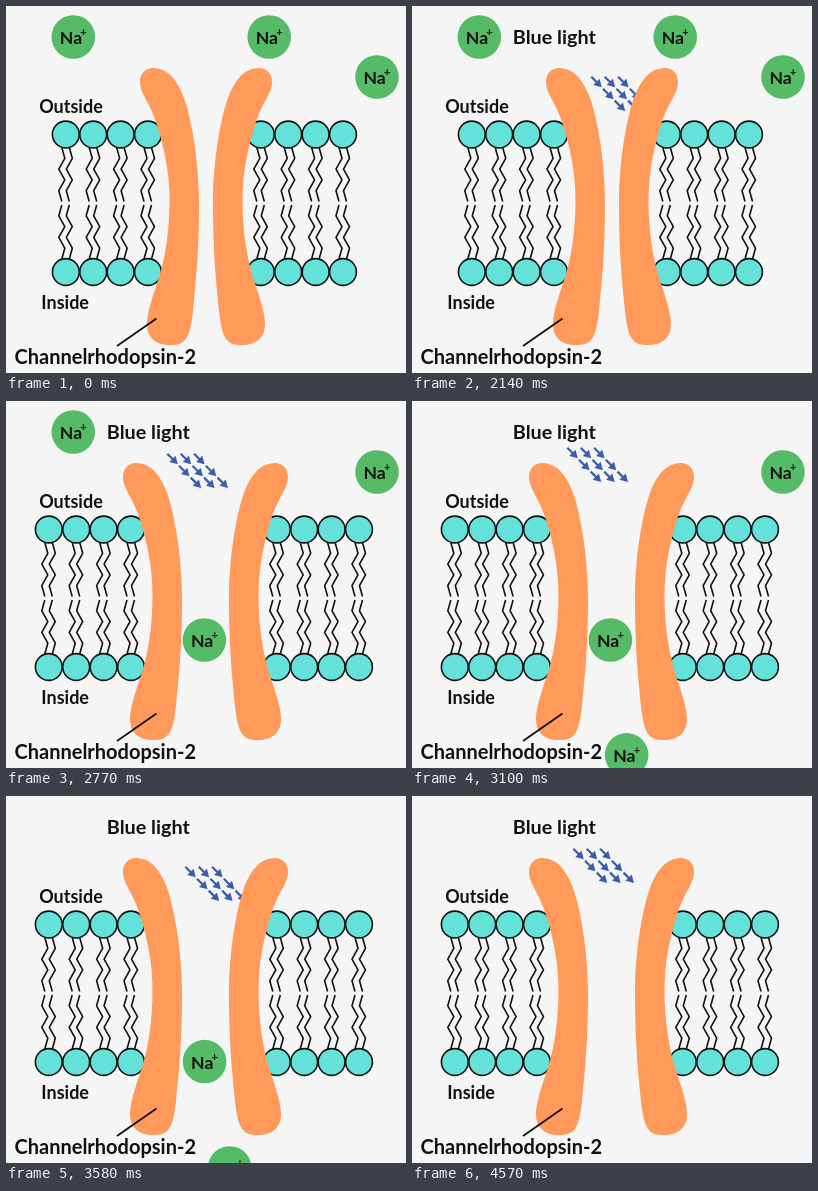
Write an HTML page that moves like this. It is 400 px wide and 367 px high and loops after 4600 ms.

```html
<!DOCTYPE html>
<html lang="en">
<head>
<meta charset="utf-8">
<title>Light-gated ion channel</title>
<style>
  html, body { margin: 0; width: 100%; height: 100%; overflow: hidden; background: #f5f5f5; }
  svg { display: block; width: 100%; height: 100%; }
  text { font-family: Lato, "Open Sans", sans-serif; font-weight: 700; fill: #111; }
  .head { fill: #64e1d8; stroke: #111; stroke-width: 1.6; }
  .tail { fill: none; stroke: #111; stroke-width: 1.6; stroke-linejoin: round; }
  .arrow { fill: none; stroke: #3a5db0; stroke-width: 2.2; }
  .arrow .tip { fill: #3a5db0; stroke: none; }
  .channel { fill: #ff9a5a; }
  .ion circle { fill: #56bb67; }
</style>
</head>
<body>
<svg viewBox="0 0 400 367">
  <defs>
    <g id="lipid">
      <path id="tails" class="tail"/>
      <circle class="head" r="13.4"/>
    </g>
    <g id="arrow" class="arrow">
      <path d="M-5 -5 L1 1"/>
      <path class="tip" d="M5.500 5.500 L-3 3.200 L3.200 -3 Z"/>
    </g>
    <path id="channel" class="channel" d="M134 76 C134 67 140 62 147 62
      C163 62 172 76 178 92 S193 150 193 198 S190 275 187 305 S178 339 164 339
      S141 332 141 318 S149 285 154 268 S163.500 225 163.500 195 S158 142 151 119 S134 88 134 76 Z"/>
    <g id="ion" class="ion">
      <circle r="21.8"/>
      <text x="-13.500" y="7" font-size="17.600">Na</text>
      <text x="7" y="-.8" font-size="11">+</text>
    </g>
  </defs>
  <g id="arrows"></g>
  <g id="left"></g>
  <g id="right"></g>
  <path d="M111 340 L150.500 312.500" stroke="#111" stroke-width="1.8"/>
  <text x="33.200" y="107" font-size="18">Outside</text>
  <text x="35.300" y="303" font-size="18">Inside</text>
  <text x="8.500" y="358" font-size="20">Channelrhodopsin-2</text>
  <text id="light" x="100.800" y="38" font-size="19.800">Blue light</text>
  <g id="ions"></g>
</svg>
<script>
const LOOP = 4600, START = 1900, STEP = 30;
const $ = id => document.getElementById(id);
const clamp = (v, lo = 0, hi = 1) => Math.min(hi, Math.max(lo, v));
const lerp = (a, b, u) => a + (b - a) * u;
const smooth = u => u * u * (3 - 2 * u);
const easeOut = u => Math.sin(u * Math.PI / 2);
const bezier = (a, b, c, d, u) => lerp(
  lerp(lerp(a, b, u), lerp(b, c, u), u),
  lerp(lerp(b, c, u), lerp(c, d, u), u), u);

function use(parent, id, transform = '') {
  const el = document.createElementNS('http://www.w3.org/2000/svg', 'use');
  el.setAttribute('href', '#' + id);
  el.setAttribute('transform', transform);
  parent.appendChild(el);
  return el;
}

const move = (el, x, y) => el.setAttribute('transform', `translate(${x.toFixed(2)} ${y.toFixed(2)})`);

// A strand starts and ends on its axis and swings to both sides between
function zigzag(x) {
  const points = Array.from({ length: 6 }, (_, i) => {
    const swing = i % 5 === 0 ? 0 : i % 2 ? 3 : -3;
    return `${x + swing} ${13 + i * 10.8}`;
  });
  return 'M' + points.join(' L');
}
$('tails').setAttribute('d', zigzag(-4) + zigzag(3.5));

// Each half: four lipid pairs behind one channel wall
function buildHalf(half, firstX, wall) {
  for (let i = 0; i < 4; i++) {
    const x = firstX + i * 27.4;
    use(half, 'lipid', `translate(${x} 128.500)`);
    use(half, 'lipid', `translate(${x} 266) scale(1 -1)`);
  }
  use(half, 'channel', wall);
}
buildHalf($('left'), 59.8, '');
buildHalf($('right'), 254.8, 'translate(400 0) scale(-1 1)');

const arrows = Array.from({ length: 9 }, (_, i) => {
  const row = Math.floor(i / 3), col = i % 3;
  return { el: use($('arrows'), 'arrow'), row, x: 160.3 + row * 11.7 + col * 13.4, y: 51.8 + row * 11.9 };
});

// An ion leaves its place, reaches the pore at `gate` and sinks away during `sink`
const PORE = { x: 198.4, y: 239 };
const ions = [
  { x: 67.3, y: 31, top: 31, leave: 2770, gate: 3100, sink: 700 },
  { x: 263.2, y: 31, top: 31, leave: 2290, gate: 2770, sink: 600 },
  { x: 371, y: 71, top: -6, leave: 3130, gate: 3490, sink: 800 }
];
for (const ion of ions) ion.el = use($('ions'), 'ion');

function drawIon(ion, t) {
  const enter = smooth(clamp((t - ion.leave) / (ion.gate - ion.leave)));
  const exit = easeOut(clamp((t - ion.gate) / ion.sink));
  const x = bezier(ion.x, lerp(ion.x, PORE.x, 0.7), PORE.x, PORE.x, enter);
  const y = bezier(ion.y, ion.top, ion.top, PORE.y, enter);
  move(ion.el, x + 37 * exit ** 3, y + 151 * exit);
}

const PULSE = 360, FIRST_PULSE = 1960;

// Rows switch to the next pulse one step after another
function drawArrow(arrow, t) {
  const lag = (arrow.row - 1) * STEP;
  const age = t - FIRST_PULSE - lag;
  const shift = clamp((age % PULSE + lag - 60) * 0.2, 0, 35);
  arrow.el.style.display = age < 0 ? 'none' : '';
  move(arrow.el, arrow.x + shift, arrow.y + shift);
}

function draw(t) {
  if (t >= START) t -= (t - START) % STEP;
  $('light').style.opacity = t < 1500 ? 0 : t < 1700 ? 0.2 : 1;
  const open = smooth(clamp((t - 2230) / 180));
  move($('left'), -17 * open, 0);
  move($('right'), 16 * open, 0);
  arrows.forEach(arrow => drawArrow(arrow, t));
  ions.forEach(ion => drawIon(ion, t));
}

const begin = performance.now();
function tick() {
  draw((performance.now() - begin) % LOOP);
  requestAnimationFrame(tick);
}
tick();
</script>
</body>
</html>
```
